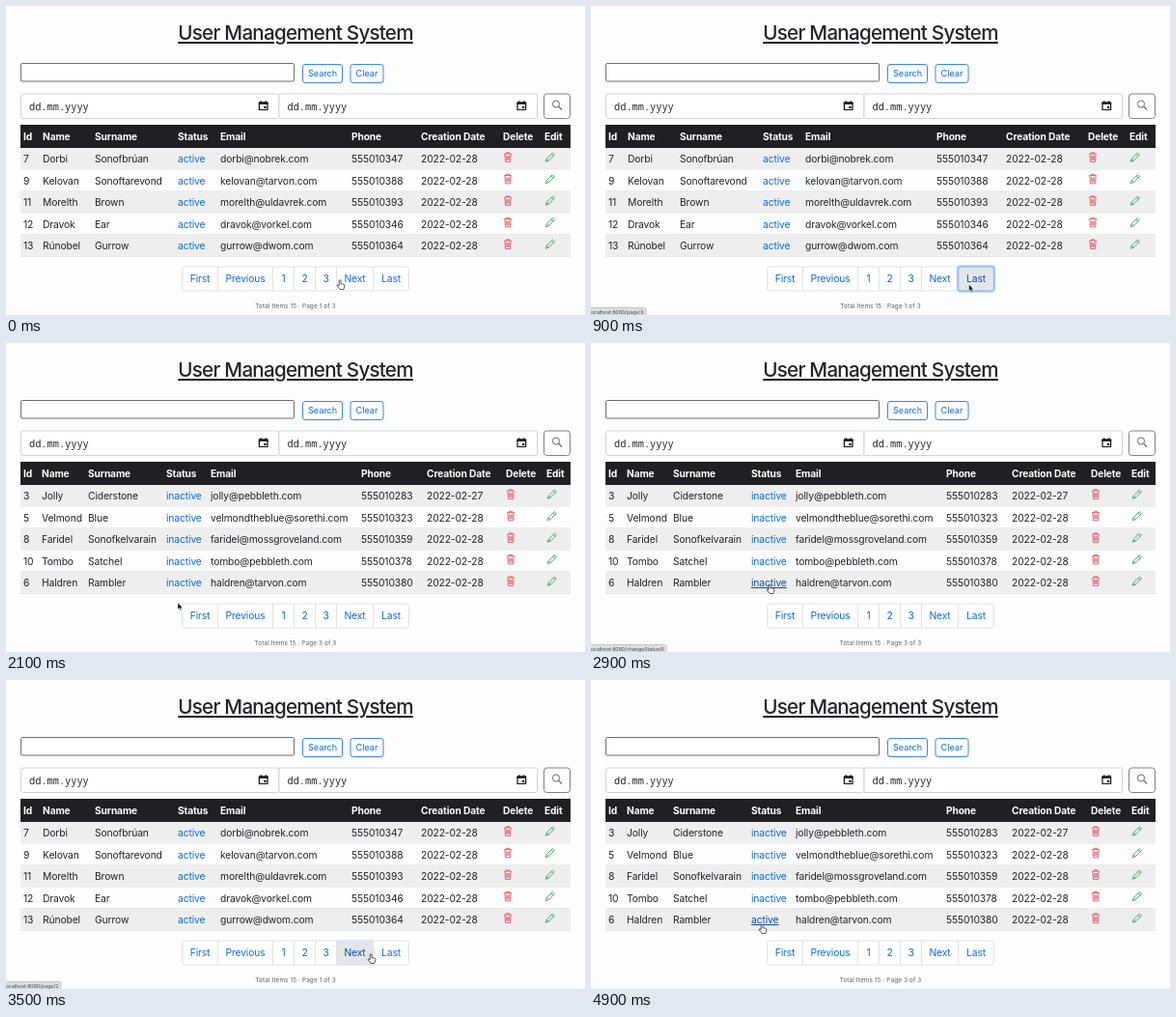
Animation of 600x320 px, one loop 5 s. Source, as an HTML page:

```html
<!DOCTYPE html>
<html lang="en">
<head>
<meta charset="utf-8">
<title>User Management System</title>
<style>
  html, body { margin: 0; width: 100%; height: 100%; overflow: hidden; background: #fdfdfd; }
  svg { display: block; width: 600px; height: 320px; }
  text { font: 10.3px Inter, "Open Sans", sans-serif; letter-spacing: -.12px; fill: #212529; }
  .title { font-size: 20.6px; font-weight: 500; letter-spacing: -.75px; text-decoration: underline; }
  .head { font-weight: 700; font-size: 10.2px; fill: #fff; }
  .link { fill: #0b6be0; }
  .on { fill: #0a4fb0; }
  .under { text-decoration: underline; }
  .mid { text-anchor: middle; }
  .small { font-size: 9.1px; letter-spacing: 0; }
  .date { font: 10.3px "Noto Sans Mono", monospace; letter-spacing: 0; }
  .foot { font-size: 6.4px; letter-spacing: .12px; fill: #5c5f63; }
  .url { font-size: 5.2px; letter-spacing: 0; fill: #44474b; }
</style>
</head>
<body>
<svg id="stage" viewBox="0 0 600 320"></svg>
<script>
const stage = document.getElementById("stage");
const LOOP = 5000, STEP = 100;

const heads = ["Id", "Name", "Surname", "Status", "Email", "Phone", "Creation Date", "Delete", "Edit"];
const pages = {
  1: {
    cols: [18, 38, 92, 178, 222, 358, 430, 515, 558],
    status: "active",
    rows: [
      [7, "Dorbi", "Sonofbrúan", "dorbi@nobrek.com", "555010347"],
      [9, "Kelovan", "Sonoftarevond", "kelovan@tarvon.com", "555010388"],
      [11, "Morelth", "Brown", "morelth@uldavrek.com", "555010393"],
      [12, "Dravok", "Ear", "dravok@vorkel.com", "555010346"],
      [13, "Rúnobel", "Gurrow", "gurrow@dwom.com", "555010364"]
    ]
  },
  3: {
    cols: [18, 37, 85, 166, 212, 368, 436, 518, 560],
    status: "inactive",
    rows: [
      [3, "Jolly", "Ciderstone", "jolly@pebbleth.com", "555010283"],
      [5, "Velmond", "Blue", "velmondtheblue@sorethi.com", "555010323"],
      [8, "Faridel", "Sonofkelvarain", "faridel@mossgroveland.com", "555010359"],
      [10, "Tombo", "Satchel", "tombo@pebbleth.com", "555010378"],
      [6, "Haldren", "Rambler", "haldren@tarvon.com", "555010380"]
    ]
  }
};
const links = ["First", "Previous", "1", "2", "3", "Next", "Last"];
const edges = [182.5, 219.5, 276.5, 298.5, 320.5, 342.5, 380.5, 417.5];

// start time, page, hovered item, pointer shape, link address
const scenes = [
  [0, 1, "", "hand", ""],
  [100, 1, "Next", "hand", ""],
  [400, 1, "Last", "hand", ""],
  [700, 1, "Last focus", "arrow", "page/3"],
  [1000, 3, "", "arrow", "page/3"],
  [1100, 3, "", "arrow", ""],
  [1700, 3, "status", "hand", ""],
  [1900, 3, "", "arrow", ""],
  [2400, 3, "status", "hand", ""],
  [2600, 3, "status", "hand", "changeStatus/6"],
  [3000, 1, "", "arrow", "changeStatus/6"],
  [3300, 1, "Next", "hand", "page/2"],
  [3700, 1, "Last", "hand", "page/3"],
  [3900, 1, "Last focus", "hand", "page/3"],
  [4000, 3, "Last", "hand", "page/3"],
  [4300, 3, "", "arrow", ""],
  [4700, 3, "status", "hand", ""]
];
// time, x, y of the pointer tip
const path = [
  [0, 346, 284], [200, 362, 284], [500, 393, 286], [700, 395, 289], [1000, 390, 288],
  [1200, 199, 283], [1400, 142, 260], [1500, 136, 257], [1700, 178, 250], [1800, 180, 250],
  [2000, 172, 266], [2200, 184, 272], [2400, 187, 252], [2700, 185, 250], [3000, 185, 250],
  [3300, 364, 282], [3500, 378, 284], [3700, 391, 284], [4000, 397, 284], [4200, 397, 284],
  [4600, 205, 258], [4800, 181, 253], [4900, 177, 253]
];

const text = (x, y, s, cls = "") => `<text x="${x}" y="${y}" class="${cls}">${s}</text>`;
const rect = (x, y, w, h, fill, stroke = "none", r = 0) =>
  `<rect x="${x}" y="${y}" width="${w}" height="${h}" rx="${r}" fill="${fill}" stroke="${stroke}"/>`;
const line = (d, stroke, width = 1, fill = "none") =>
  `<path d="${d}" fill="${fill}" stroke="${stroke}" stroke-width="${width}" stroke-linejoin="round"/>`;
const move = (x, y, s) => `<g transform="translate(${x} ${y})">${s}</g>`;

const trash = line("M.6 1.9h7.8M3 1.7V.6h3v1.1M1.4 2.2l.6 8h5l.6-8M3.2 3.8l.2 4.8M4.5 3.8v4.8M5.8 3.8l-.2 4.8", "#dc3545", .75);
const pencil = line("M.6 9.8l1-3L7.8.7l2 2L3.6 8.8zM6.5 2l2 2M1.6 6.8l2 2", "#2a9d50", .8);
const calendar = line("M.7 2h8.6v7.3H.7z", "#111", 1.2) + rect(.2, 1.4, 9.6, 2.2, "#111") +
  line("M2.5 0v2M7.5 0v2", "#111", 1.2) + rect(5.6, 5.6, 2.3, 2.3, "#111");
const pointers = {
  hand: line("M-.8.6a.9.9 0 0 1 1.8 0V3.6l2.6.5q1.4.3 1.3 1.6l-.5 2.6-.6 1.2H.2L-2.6 6q-.6-1 .4-1.2l1.4.8z", "#111", .7, "#fff"),
  arrow: line("M0 0v7l1.6-1.4 1.1 2.4 1.2-.5-1.1-2.4h2.1z", "#fff", .5, "#000")
};

const form = rect(0, 0, 600, 320, "#fdfdfd") +
  text(300, 35, "User Management System", "title mid") +
  rect(15.5, 59.5, 283, 18.5, "#fff", "#6f6f73", 1) +
  rect(307.5, 60.5, 41, 19, "#fff", "#3b86ee", 2.5) + text(328, 73.4, "Search", "small link mid") +
  rect(357, 60.5, 34, 19, "#fff", "#3b86ee", 2.5) + text(374, 73.4, "Clear", "small link mid") +
  rect(15.5, 91, 267.5, 25.5, "#fff", "#ced4da", 2.5) +
  rect(283, 91, 267.5, 25.5, "#fff", "#ced4da", 1) +
  text(24, 107.5, "dd.mm.yyyy", "date") + text(291.5, 107.5, "dd.mm.yyyy", "date") +
  move(261.7, 98.2, calendar) + move(529.3, 98.2, calendar) +
  rect(557.5, 91, 27, 25.5, "#fff", "#7b8289", 3) +
  `<circle cx="570" cy="101.5" r="3.6" fill="none" stroke="#555b61" stroke-width=".9"/>` +
  line("M572.7 104.2l3.4 3.4", "#555b61", 1.2);

function table(page, hover, toggled) {
  const { cols, rows, status } = pages[page];
  let out = rect(15, 123, 570, 24, "#1f2024");
  heads.forEach((h, i) => out += text(cols[i], 138.8, h, "head"));
  rows.forEach(([id, name, surname, mail, phone], i) => {
    const top = 147 + 22.5 * i, base = top + 15, last = page === 3 && i === 4;
    out += rect(15, top, 570, 22.5, i % 2 ? "#fdfdfd" : "#eeeeee") +
      rect(15, top + 22, 570, .7, "#dadde1");
    const state = last && toggled ? "active" : status;
    const cells = [id, name, surname, state, mail, phone, page === 3 && !i ? "2022-02-27" : "2022-02-28"];
    cells.forEach((c, k) => {
      const cls = k !== 3 ? "" : last && hover === "status" ? "link on under" : "link";
      out += text(cols[k], base, c, cls);
    });
    out += move(cols[7] + .5, top + 4.2, trash) + move(cols[8] + .6, top + 4.4, pencil);
  });
  return out;
}

function pager(page, hover) {
  const [name, focus] = hover.split(" ");
  let out = rect(182.5, 270, 235, 25, "#fff", "#dee2e6", 3), top = "";
  links.forEach((s, i) => {
    const x = edges[i], w = edges[i + 1] - x, on = s === name;
    if (on) out += rect(x, 270, w, 25, "#e3e6e9", "#dee2e6", i === 6 ? 3 : 0);
    else if (i) out += rect(x - .5, 270, 1, 25, "#dee2e6");
    if (on && focus) top = `<rect x="${x - .5}" y="269.5" width="${w + 1}" height="26" rx="3" fill="none" stroke="#0d6efd" stroke-opacity=".32" stroke-width="2.6"/>`;
    out += text(x + w / 2, 286.3, s, on ? "link on mid" : "link mid");
  });
  return out + top + text(300, 312.6, `Total Items 15 : Page ${page} of 3`, "foot mid");
}

function pointerAt(t) {
  const i = path.findIndex(p => p[0] > t);
  if (i < 0) return path[path.length - 1].slice(1);
  const [t0, x0, y0] = path[i - 1], [t1, x1, y1] = path[i];
  const k = (t - t0) / (t1 - t0);
  return [x0 + (x1 - x0) * k, y0 + (y1 - y0) * k];
}

function draw(t) {
  const [, page, hover, shape, url] = scenes.filter(s => s[0] <= t).pop();
  const bar = url && rect(-3, 312.5, url.length > 6 ? 81 : 60, 10, "#dcdee2", "#c4c7cb", 1.5) +
    text(-1.5, 318.6, "localhost:8080/" + url, "url");
  stage.innerHTML = form + table(page, hover, t >= 3000) + pager(page, hover) + bar +
    move(...pointerAt(t), pointers[shape]);
}

let shown = -1;
function tick() {
  const t = Math.floor(performance.now() % LOOP / STEP) * STEP;
  if (t !== shown) draw(shown = t);
  requestAnimationFrame(tick);
}
tick();
</script>
</body>
</html>
```
